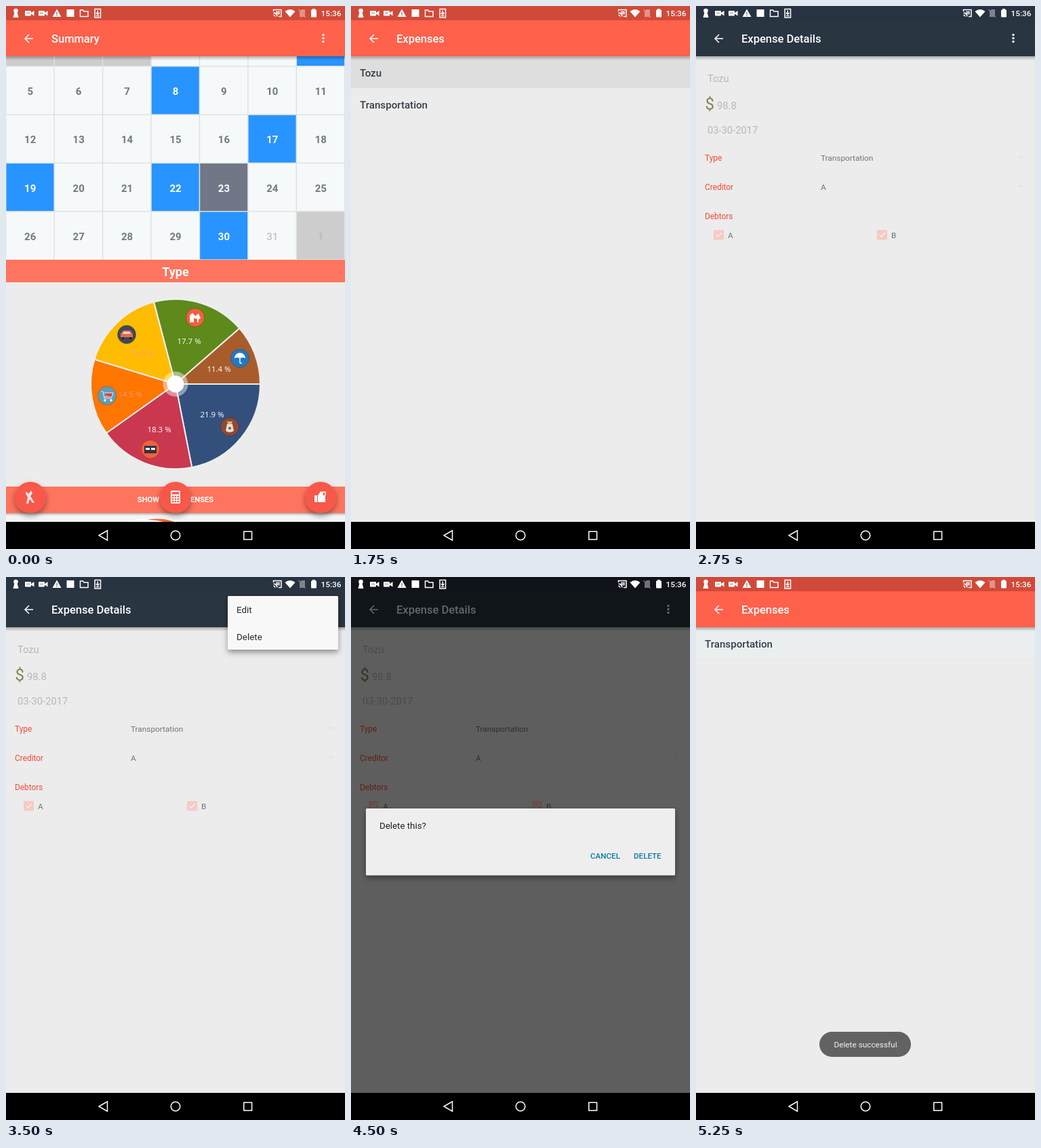
These frames come from a looping animation (500 px wide and 800 px high, 5500 ms). An HTML page:

```html
<!DOCTYPE html>
<html lang="en">
<head>
<meta charset="utf-8">
<title>Expense tracker</title>
<style>
html, body { margin: 0; width: 100%; height: 100%; overflow: hidden; background: #000; }
svg { display: block; width: 500px; height: 800px; font-family: Roboto, sans-serif; }
.line { fill: none; stroke: #fff; stroke-width: 1.5; }
</style>
</head>
<body>
<svg id="stage" viewBox="0 0 500 800">
  <defs>
    <linearGradient id="fall" x2="0" y2="1">
      <stop stop-opacity=".28"/><stop offset="1" stop-opacity="0"/>
    </linearGradient>
    <filter id="lift" x="-20%" y="-30%" width="140%" height="170%">
      <feDropShadow dx="0" dy="4" stdDeviation="4" flood-opacity=".4"/>
    </filter>
  </defs>
</svg>
<script>
const LOOP = 5500;
const stage = document.getElementById('stage');

const rect = (x, y, w, h, fill, more = '') =>
  `<rect x="${x}" y="${y}" width="${w}" height="${h}" fill="${fill}" ${more}/>`;
const disc = (x, y, r, fill, more = '') =>
  `<circle cx="${x}" cy="${y}" r="${r}" fill="${fill}" ${more}/>`;
const path = (d, fill, more = '') => `<path d="${d}" fill="${fill}" ${more}/>`;
const line = (d, more = '') => `<path d="${d}" class="line" ${more}/>`;
const text = (x, y, size, fill, s, more = '') =>
  `<text x="${x}" y="${y}" font-size="${size}" fill="${fill}" ${more}>${s}</text>`;
const at = (x, y, s) => `<g transform="translate(${x} ${y})">${s}</g>`;
const MID = 'text-anchor="middle"', MEDIUM = 'font-weight="500"', BOLD = 'font-weight="700"';

function layer(s) {
  const g = document.createElementNS('http://www.w3.org/2000/svg', 'g');
  g.innerHTML = s;
  stage.append(g);
  return g;
}

const page = rect(0, 74, 500, 686, '#ececec');

function toolbar(title, top, bar, dots) {
  return rect(0, 0, 500, 21, top) + rect(0, 21, 500, 53, bar) +
    rect(0, 74, 500, 6, 'url(#fall)') +
    line('M40 48H28.5M34 42L28 48L34 54', 'stroke-width="1.7"') +
    text(67, 54, 16.5, '#fff', title, MEDIUM) +
    (dots ? [42.5, 47.5, 52.5].map(y => disc(468, y, 1.7, '#fff')).join('') : '');
}
const redBar = (title, dots) => toolbar(title, '#d04a39', '#ff614b', dots);

// Calendar
const BLUE = '#2894ff';
function calendar() {
  const w = 500 / 7;
  let s = rect(0, 74, 500, 300, '#dfe2e3');
  for (let i = -2; i < 28; i++) {
    if (i < 0) continue;
    const day = i + 5, x = i % 7 * w, y = 89 + Math.floor(i / 7) * 71.3;
    const fill = [8, 17, 19, 22, 30].includes(day) ? BLUE :
      day === 23 ? '#717786' : day > 31 ? '#cdcdcd' : '#f5f9f9';
    const ink = fill === BLUE || day === 23 ? '#fff' :
      day > 31 ? '#bbb' : day === 31 ? '#c6c9cc' : '#737984';
    s += rect(x + .5, y + .5, w - 1.5, 69.8, fill) +
      text(x + w / 2, y + 42, 15, ink, day > 31 ? day - 31 : day, MID + ' ' + BOLD);
  }
  for (let i = 0; i < 7; i++)
    s += rect(i * w + .5, 74, w - 1.5, 14, i < 3 ? '#cdcdcd' : i < 6 ? '#f5f9f9' : BLUE);
  return s;
}

// Pie chart: share, colour, label place, icon place, icon colour, icon drawing
const slices = [
  [21.9, '#33507d', 304, 606, 330, 620, '#8c4938',
    path('M-4 -4L-6 6Q0 10 6 6L4 -4Z', '#eadfc8') + path('M-4 -8H4L3 -4H-3Z', '#d9b36a') + disc(0, 2, 2, '#6b5a4a')],
  [18.3, '#c9384f', 226, 628, 213, 653, '#f2603f',
    rect(-9, -5, 18, 6, '#25384a') + rect(-7, -2, 6, 3, '#fff') + rect(1, -2, 6, 3, '#fff') + rect(-9, 1, 18, 5, '#3a3038')],
  [14.5, '#ff7600', 183, 576, 149, 574, '#5f9fba',
    path('M-9 -6H-6L-4 4H7M-5 -4H9L7 2H-4', '#d5434a', 'stroke="#e9eef0"') + disc(-3, 7, 1.7, '#fff') + disc(6, 7, 1.7, '#fff')],
  [16.2, '#ffbc00', 202, 515, 178, 484, '#3d4a58',
    path('M-9 4V-1L-5 -6H5L9 -1V4Z', '#e66a50') + path('M-6 -1L-4 -4H4L6 -1Z', '#e9dfd0') + rect(-7, 4, 3, 3, '#222') + rect(4, 4, 3, 3, '#222')],
  [17.7, '#5d8a1a', 270, 498, 279, 459, '#f2603f',
    path('M-8 7V-3L-4 -7L0 -2L5 -6L8 1L5 3V7H3V2L-2 1V7Z', '#fff')],
  [11.4, '#a95c2b', 314, 539, 345, 519, '#2079c3',
    path('M-8 0A8 8 0 0 1 8 0Q4 -2 0 0Q-4 -2 -8 0Z', '#fff') + line('M0 0V6Q0 8 3 7')]
];
function pie() {
  const cx = 250, cy = 557, r = 125;
  const rim = share => {
    const a = share * Math.PI / 50;
    return `${cx + r * Math.cos(a)} ${cy + r * Math.sin(a)}`;
  };
  let sum = 0, s = '', marks = '';
  for (const [share, fill, tx, ty, ix, iy, tint, icon] of slices) {
    s += path(`M${cx} ${cy}L${rim(sum)}A${r} ${r} 0 0 1 ${rim(sum += share)}Z`, fill,
      'stroke="#eee" stroke-width="2"');
    const pale = [14.5, 16.2].includes(share) ? '#ff9c78' : '#fff';
    marks += text(tx, ty, 11.5, pale, share + ' %', MID + ' font-family="Open Sans, sans-serif"') +
      at(ix, iy, disc(0, 0, 13.5, tint, 'stroke="#0003"') + icon);
  }
  return s + disc(cx, cy, 18.5, '#fff', 'opacity=".45"') + disc(cx, cy, 12.5, '#fff') + marks;
}

function fab(x, icon) {
  return at(x, 724, disc(0, 0, 23, '#f7594a', 'filter="url(#lift)"') + icon);
}
function calculator() {
  let s = rect(-7, -10, 14, 19, '#fff', 'rx="1.5"') + rect(-5, -8, 10, 3.5, '#f7594a');
  for (let i = 0; i < 9; i++) s += rect(-5 + i % 3 * 3.8, -2.5 + Math.floor(i / 3) * 3.7, 2.4, 2.4, '#f7594a');
  return s;
}

const summary = layer(page + calendar() +
  rect(0, 374, 500, 33, '#ff745e') +
  text(250, 398, 18, '#fff', 'Type', MID + ' ' + BOLD) + pie() +
  rect(0, 708, 500, 39, '#ff745e') +
  text(250, 731, 11.2, '#fff', 'SHOW ALL EXPENSES', MID + ' ' + BOLD) +
  rect(0, 747, 500, 13, '#f4f4f4') + rect(0, 747, 500, 4, 'url(#fall)') +
  path('M176 760Q215 748 255 760Z', '#fff') + path('M208 757Q230 753 248 760H232Q222 757 208 757Z', '#f4633f') +
  fab(36, path('M-6 -9L-3 -5L1 -10L3 -6L0 -2L6 8H3L-1 2L-3 9H-6L-4 0L-7 -6Z', '#fff', 'opacity=".85"')) +
  fab(250, calculator()) +
  fab(464, rect(-9, -3, 4, 10, '#fff') + path('M-4 -3L0 -9L3 -7L2 -3H7V7H-4Z', '#fff') + line('M3 -3V-8H7V-3')) +
  redBar('Summary', true));

// Expense list
const INK = '#333e49';
const rowText = (y, s) => text(13, y, 15.1, INK, s, MEDIUM);
const rows = layer(page);
const press = layer(rect(0, 75, 500, 46, '#dedede'));
const both = layer(rowText(104, 'Tozu') + rowText(151, 'Transportation'));
const single = layer(rect(0, 75, 500, 46, '#ebeeef') + rect(0, 121, 500, 1, '#e5e6e7') + rowText(104, 'Transportation'));
const listBar = layer(redBar('Expenses', false));

// Expense details
const field = (x, y, s) => text(x, y, 14.7, '#b7b7ba', s);
const label = (y, s) => text(13, y, 11.9, '#f64a36', s);
const value = (x, y, s) => text(x, y, 11.8, '#737373', s);
const check = x => rect(x, 330, 15, 14.5, '#f7cac5', 'rx="1"') + line(`M${x + 3.5} 337l3 3l5.5 -6`, 'opacity=".7"');
const caret = y => path(`M475 ${y}h8l-4 4z`, '#e2e2e2');
const details = layer(page + toolbar('Expense Details', '#273340', '#293540', true) +
  field(17, 112, 'Tozu') + text(13.5, 153, 24, '#878258', '$') +
  field(31, 152, '98.8') + field(17, 188, '03-30-2017') +
  label(227.5, 'Type') + value(184, 227.5, 'Transportation') + caret(221) +
  label(270.5, 'Creditor') + value(184, 270.5, 'A') + caret(264) +
  label(313.5, 'Debtors') + check(26) + value(47, 342, 'A') + check(267) + value(288, 342, 'B'));

// Keyboard
const KEY = '#3f4c57', GREY = '#747d84';
const keys = (chars, x, y, step, size) =>
  [...chars].map((c, i) => text(x + i * step, y, size, KEY, c, MID)).join('');
const shift = x => path(`M${x} 656l-9.5 10h5v6h9v-6h5z`, GREY) + rect(x - 8.5, 680, 17, 1.5, GREY);
const grey = `fill="none" stroke="${GREY}" stroke-width="1.4"`;
const board = layer(rect(0, 467, 500, 293, '#ebeeee') + rect(0, 467, 500, 40, '#e3e3e3'));
const keyO = layer(rect(363, 520, 39, 50, '#dce0e4'));
const legends = layer(
  keys('1234567890', 29, 497, 49, 24.5) + keys('qwertyuiop', 27, 554, 44.55, 21.5) +
  keys('asdfghjkl', 49.5, 613, 44.5, 21.5) + keys('zxcvbnm!?', 71, 672, 44.6, 21.5) +
  path('M463 545l5 -7h14v14h-14z', GREY) + line('M471 542l6 6m0 -6l-6 6') +
  disc(461, 609, 14.7, '#45a9ad') + line('M468 606v4h-13m4 -4l-4 4l4 4') +
  shift(27) + shift(473) +
  text(27, 729.5, 13, KEY, '?123', MID) + text(473, 729.5, 13, KEY, '?123', MID) +
  text(71, 729, 21, KEY, ',', MID) + text(428, 729, 21, KEY, '.', MID) +
  rect(148, 713, 204, 24, '#cdd2da', 'rx="1"') +
  at(116, 724.5, `<g ${grey}><circle r="7.7"/><ellipse rx="3.5" ry="7.7"/><path d="M-7 -3H7M-7 3H7"/></g>`) +
  at(383, 724.5, `<g ${grey}><circle r="7.7"/><path d="M-4 2Q0 7 4 2"/></g>` + disc(-3, -2, 1.3, GREY) + disc(3, -2, 1.3, GREY)));

// Popup menu, dimming, dialog, toast
const menu = layer(rect(327, 28, 163, 79, '#f8f8f8', 'rx="1.5" filter="url(#lift)"'));
const menuPress = layer(rect(327, 68, 163, 39, '#e2e2e2'));
const menuText = layer(text(340, 52.5, 13.4, '#26292c', 'Edit') + text(340, 92.5, 13.4, '#26292c', 'Delete'));
const dim = layer(rect(0, 0, 500, 760, '#000'));
const dialog = layer(rect(22, 341, 456, 98.5, '#eee', 'rx="1.5" filter="url(#lift)"') +
  text(42, 370.5, 13.3, '#222', 'Delete this?') +
  text(353, 415, 11.6, '#0b76ab', 'CANCEL', MEDIUM) + text(417, 415, 11.6, '#0b76ab', 'DELETE', MEDIUM));
const toast = layer(rect(182, 670, 135, 37, '#626262', 'rx="18.5"') +
  text(250, 693, 11.8, '#f2f2f2', 'Delete successful', MID));

// Status and navigation bars
const camera = x => rect(x - 7, 7, 9, 7.5, '#fff', 'rx="1"') + path(`M${x + 2} 10l4.5 -3v7.5l-4.5 -3z`, '#fff') +
  rect(x - 5, 9.5, 5, 2, '#bbb');
layer(
  disc(14.5, 7, 3.3, '#fff') + path('M12.8 8h3.4l2.3 9h-8z', '#fff') +
  camera(35) + camera(55) +
  path('M75 4.5l6.5 11.5h-13z', '#fff') + rect(74.3, 9, 1.4, 3.5, '#777') + rect(74.3, 13.3, 1.4, 1.4, '#777') +
  rect(89.5, 5, 11, 11, '#fff') +
  line('M109.5 6h4l1.5 2h6v7.5h-11.5z') +
  line('M131 4.5h8.5v12.5h-8.5z') + line('M135.2 6.5v6m-2.3 -2.5l2.3 2.5l2.3 -2.5M133 14.5h4.5', 'stroke-width="1.2"') +
  line('M394.5 8v-2.5h11.5v10h-4M394.5 10q5 .5 5.5 5.5M394.5 13q2 .5 2.5 2.5') + rect(398, 7.5, 6, 5, '#fff', 'opacity=".7"') +
  path('M411.5 8q7.5 -6 15 0l-7.5 8.5z', '#fff') +
  `<g opacity=".4">${path('M433 8l3 -3h5v11h-8z', '#fff')}${line('M431.5 5l10 11.5', 'stroke-width="1.2"')}</g>` +
  rect(450, 5.5, 8, 11, '#fff', 'rx="1"') + rect(452, 4, 4, 2, '#fff') +
  text(464.5, 14.8, 11.8, '#fff', '15:36', MEDIUM) +
  rect(0, 760, 500, 40, '#000') + line('M256.8 780a6.8 6.8 0 1 1 -13.6 0a6.8 6.8 0 1 1 13.6 0z') +
  line('M350.8 774.3h11.8v11.6h-11.8z'));
const back = layer(line('M137 780L149.5 772.8V787.2Z'));
let dots = '';
for (let i = 0; i < 10; i++) dots += rect(473 + i % 5 * 2.4, 776.5 + Math.floor(i / 5) * 2.5, 1.3, 1.4, '#000');
const hide = layer(line('M136 774.2H151L143.5 786.5Z') +
  rect(470.5, 774.5, 16, 11.5, '#fff', 'rx="1.5"') + dots + rect(475, 782, 7, 1.5, '#000'));

// Each layer is visible during [from, to) spans in ms
const spans = [
  [summary, 0, 750],
  [both, 750, 2000], [press, 1750, 2000],
  [details, 2000, 4750],
  [board, 2000, 2750], [legends, 2000, 2750], [hide, 2000, 2750], [keyO, 2250, 2500],
  [menu, 3500, 4000], [menuText, 3500, 4000], [menuPress, 3750, 4000],
  [dim, 4250, 4750], [dialog, 4250, 4750],
  [single, 4750, LOOP], [toast, 5000, LOOP]
];
const show = (g, on) => g.setAttribute('visibility', on ? 'visible' : 'hidden');

function draw(now) {
  const t = now % LOOP;
  for (const [g, from, to] of spans) show(g, t >= from && t < to);
  const list = t >= 750 && t < 2000 || t >= 4750;
  show(rows, list);
  show(listBar, list);
  show(back, t < 2000 || t >= 2750);
  dim.setAttribute('opacity', t < 4500 ? .33 : .6);
  requestAnimationFrame(draw);
}
draw(performance.now());
</script>
</body>
</html>
```
